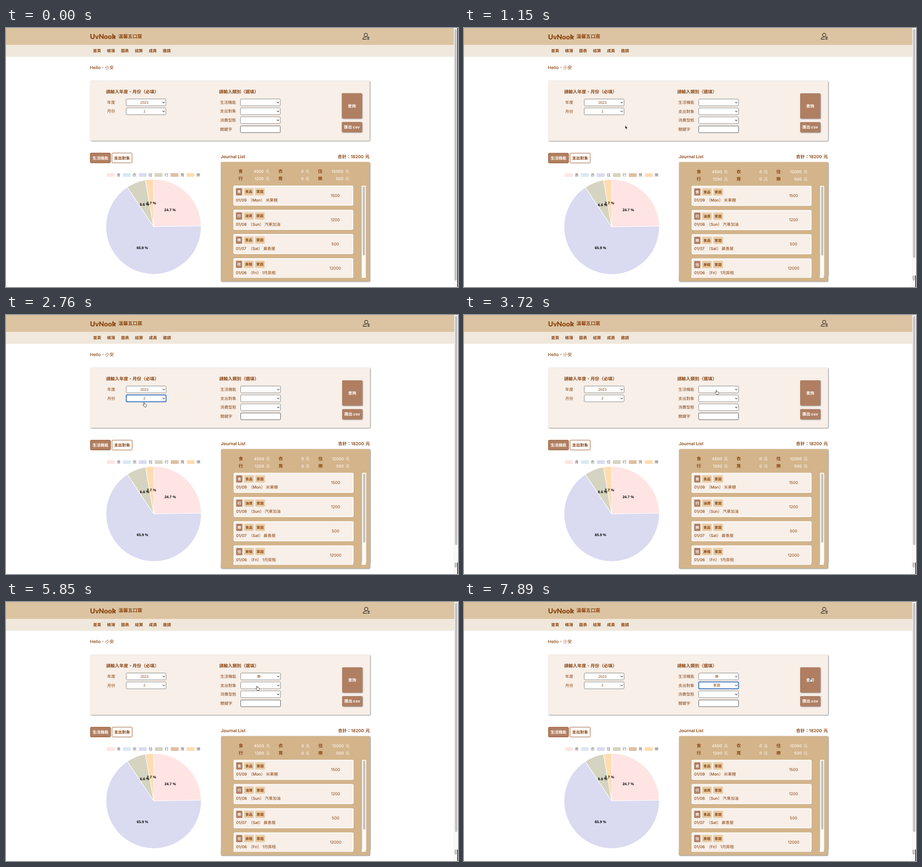
An HTML page that plays this animation: 987x567 px, repeating every 8 s.

```html
<!DOCTYPE html>
<html lang="zh-TW">
<head>
<meta charset="utf-8">
<title>Journal</title>
<style>
html, body { margin: 0; width: 100%; height: 100%; overflow: hidden; background: #fff; }
svg { display: block; font-family: Inter, "Noto Sans CJK TC", "Noto Sans CJK", sans-serif; text-rendering: geometricPrecision; }
.arial { font-family: "Liberation Sans", "Noto Sans CJK TC", sans-serif; }
.logo { font-family: Lato, sans-serif; }
.shadow { filter: drop-shadow(1.5px 1.5px 1.3px rgba(0, 0, 0, .5)); }
</style>
</head>
<body>
<svg id="stage" width="987" height="567" viewBox="0 0 987 567">
  <clipPath id="fresh"><rect x="183" width="804" height="542"/></clipPath>
  <clipPath id="list"><rect x="495" y="344" width="266" height="203.3"/></clipPath>
  <g id="first" transform="scale(.999)"></g>
  <g id="second" clip-path="url(#fresh)"></g>
  <g id="live"></g>
  <g id="arrow"><path d="M0 0V7.6L1.8 6 3 8.8 4.3 8.2 3.1 5.5H5.4Z" fill="#111" stroke="#fff" stroke-width=".6"/></g>
  <g id="hand"><path d="M1.1 .8C1.1-.2 2.6-.2 2.7.8L3 3.5C3.3 2.9 4.4 3 4.5 3.7 4.9 3.2 5.8 3.4 5.9 4.1 6.5 3.8 7.1 4.2 7.1 4.9V7L6.3 9.7H2.6L1.9 8.3-.4 5.9C-.8 5.1.3 4.6.9 5.2L1.6 5.8Z" fill="#fff" stroke="#222" stroke-width=".8" stroke-linejoin="round"/></g>
</svg>
<script>
const BROWN = '#8b4513', CLAY = '#b07f62', CREAM = '#f7efe8', TAN = '#d3b48b', GREY = '#c1c1c1';
const $ = id => document.getElementById(id);

const rect = (x, y, w, h, fill, more = '') =>
  `<rect x="${x}" y="${y}" width="${w}" height="${h}" fill="${fill}" ${more}/>`;

const text = (x, y, str, size = 8.7, { fill = BROWN, weight = 500, anchor = 'start', cls = '' } = {}) =>
  `<text x="${x}" y="${y}" font-size="${size}" fill="${fill}" font-weight="${weight}" text-anchor="${anchor}" class="${cls}">${str}</text>`;

const bold = { weight: 700 };
const mid = (fill, weight = 700, cls = '') => ({ fill, weight, cls, anchor: 'middle' });

function header() {
  const nav = ['首頁', '帳簿', '圖表', '結算', '成員', '邀請'];
  return rect(0, 0, 979, 37, '#dcc4a2') + rect(0, 37, 979, 26, '#f0e8dc') +
    text(183.5, 24.5, 'UvNook', 15, { weight: 900, cls: 'logo' }) +
    `<path d="M234.5 15.8 239 19.2 234.5 22.6" fill="none" stroke="${BROWN}" stroke-width="1.6"/>` +
    text(245.5, 22.2, '溫馨五口窩', 10.4, bold) +
    `<g fill="none" stroke="#222" stroke-width="1.2"><circle cx="786.5" cy="15.3" r="3.7"/>
     <path d="M788 24.6H780C780 21.5 782 20 786 20H788M789.5 19.8H794M789.5 22.2H794M789.5 24.6H794"/></g>` +
    nav.map((s, i) => text(190.2 + i * 30.5, 53.2, s, 8.7, { weight: 600 })).join('') +
    text(183.3, 90.3, 'Hello，小安', 9.6);
}

function select(x, y) {
  return rect(x, y, 87, 15, '#fff', 'rx="2" stroke="#767676" stroke-width=".9"') +
    `<path d="M${x + 79.6} ${y + 6.3}l2.4 2.5 2.4-2.5" fill="none" stroke="#444" stroke-width="1.1"/>`;
}

function button(y, h, label) {
  return rect(734, y, 44, h, CLAY, 'rx="2" class="shadow"') +
    text(756, y + h / 2 + 3.2, label, 8.7, mid('#fff'));
}

function form() {
  const labels = ['生活機能', '支出對象', '消費型態', '關鍵字'];
  return rect(184, 115.5, 611, 131.5, CREAM, 'rx="2" class="shadow"') +
    text(218.7, 143.3, '請輸入年度、月份（必填）', 9.6, bold) +
    text(465.7, 143.3, '請輸入類別（選填）', 9.6, bold) +
    text(221, 165.8, '年度') + text(221, 185.5, '月份') +
    select(262.5, 155.5) + select(262.5, 175) +
    text(302.3, 165.7, '2023', 8, mid(BROWN, 400, 'arial')) +
    labels.map((s, i) => text(468, 165.8 + i * 19.7, s)).join('') +
    [155.5, 175, 194.6].map(y => select(512.5, y)).join('') +
    rect(512.5, 214.5, 87, 14.7, '#fff', 'rx="1.5" stroke="#555"') +
    button(143, 55, '查詢') + button(206, 22.3, '匯出 csv');
}

function pie() {
  const cx = 322.5, cy = 435.5, r = 104, total = 18200;
  const names = [...'食衣住行育樂'];
  const colors = ['#ffe4e4', '#dbe7f5', '#dadaf1', '#d5d4c0', '#e0bea0', '#ffdcb0'];
  const sums = [4500, 0, 12000, 1200, 0, 500];
  const at = v => {
    const a = v / total * 2 * Math.PI;
    return `${cx + r * Math.sin(a)} ${cy - r * Math.cos(a)}`;
  };
  let out = '', acc = 0;
  names.forEach((name, i) => {
    const x = 220.5 + i * 34.85, next = acc + sums[i];
    out += rect(x, 318, 17, 8, colors[i]) + text(x + 21.2, 325.2, name, 8.7, { fill: '#666' });
    if (sums[i]) out += `<path d="M${cx} ${cy}L${at(acc)}A${r} ${r} 0 ${+(sums[i] > total / 2)} 1 ${at(next)}Z" fill="${colors[i]}" stroke="#fff" stroke-width="1.1"/>`;
    acc = next;
  });
  const marks = [[358.6, 401.2, '24.7'], [298, 484.3, '65.9'], [302.7, 389.5, '6.6'], [317.6, 386, '2.7']];
  return out + marks.map(([x, y, s]) => text(x, y, s + ' %', 8, mid('#000', 700, 'arial'))).join('');
}

function tabs() {
  const tab = (x, label, bg, fg) =>
    rect(x, 274, 44, 21.5, bg, `rx="2" stroke="${BROWN}" stroke-width=".9"`) +
    text(x + 22, 287.9, label, 8.7, mid(fg));
  return tab(184.3, '生活機能', CLAY, '#fff') + tab(231.5, '支出對象', '#fff', BROWN);
}

function card(i, [kind, tag, date, day, x, note, sum]) {
  const y = 346.3 + i * 53;
  const chip = (cx, w, s, bg, fg) =>
    rect(cx, y + 4.7, w, 15.8, bg, 'rx="1.5"') + text(cx + w / 2, y + 15.4, s, 7.8, mid(fg));
  return rect(498, y, 260, 42, CREAM, 'rx="2" stroke="#fff" stroke-width="1.8"') +
    chip(502.6, 13.6, kind, CLAY, '#fff') +
    chip(520, 21, tag, '#e8cca5', BROWN) + chip(544.5, 21, '家庭', '#e8cca5', BROWN) +
    text(502.5, y + 34, date) + text(529.8, y + 34, `（${day}）`) + text(x, y + 34, note) +
    text(719.6, y + 24, sum, 8.7, mid(BROWN, 400));
}

function journal() {
  const sums = ['4500', '0', '12000', '1200', '0', '500'];
  const ends = [563.5, 650.5, 737.5];
  const pale = { fill: '#fffaf3' };
  const cards = [
    ['食', '食品', '01/09', 'Mon', 567.5, '米果棚', 1500],
    ['行', '油資', '01/08', 'Sun', 565, '汽車加油', 1200],
    ['樂', '食品', '01/07', 'Sat', 562.5, '晨香屋', 500],
    ['住', '房租', '01/06', 'Fri', 559.8, '1月房租', 12000]
  ];
  return text(469.3, 285.3, 'Journal List', 9.5, { weight: 600 }) +
    text(725, 285.3, '合計：', 9.6, bold) + text(753.5, 285.3, '18200', 9.4, { weight: 600 }) +
    text(785, 285.3, '元', 9.6, bold) +
    rect(469.5, 293.5, 325.5, 261.5, TAN, 'rx="2" class="shadow"') +
    [...'食衣住行育樂'].map((s, i) => {
      const end = ends[i % 3], y = i < 3 ? 317.8 : 333.6;
      return text(508 + i % 3 * 87, y, s, 9.6, bold) +
        text(end, y, sums[i], 8.7, { ...pale, anchor: 'end' }) + text(end + 4, y, '元', 8.7, pale);
    }).join('') +
    `<g clip-path="url(#list)">${cards.map((c, i) => card(i, c)).join('')}</g>` +
    rect(777.5, 345.5, 9, 202, '#fafafa') + rect(779.8, 347.3, 4.7, 151, GREY, 'rx="2.3"');
}

const page = thumb => rect(0, 0, 987, 568, '#fff') + header() + form() + tabs() + pie() + journal() +
  rect(979, 0, 8, 568, '#fafafa') + rect(978.8, 0, .6, 568, '#e6e6e6') +
  rect(980.5, 2, 5, thumb, GREY, 'rx="2.5"');

$('first').innerHTML = page(551.5) + rect(986.6, 0, 2, 568, '#111');
$('second').innerHTML = page(501.5);

// start, end, steps, from x y, to x y (pointer tip)
const moves = [
  [840, 1390, 8, 390, 246, 314, 181],
  [2760, 2850, 1, 299.5, 191.5, 299.5, 191.5],
  [3022, 3720, 9, 299.5, 191.5, 548.8, 164.6],
  [5410, 5690, 4, 540.4, 203, 546, 184],
  [7260, 7890, 8, 533.8, 206.5, 754.5, 166]
];
// x, y, w, h of clickable areas
const hot = [[262, 155, 88, 37], [512, 155, 88, 16], [512, 174, 88, 17], [512, 194, 88, 16], [734, 143, 44, 55]];
const ease = p => p * p * (3 - 2 * p);

function pointer(t) {
  const m = moves.filter(m => t >= m[0]).pop();
  if (!m) return null;
  const [t0, t1, n, x0, y0, x1, y1] = m;
  const p = ease(Math.min(1, Math.floor((t - t0) / (t1 - t0) * n + 1e-6) / n));
  return [x0 + (x1 - x0) * p, y0 + (y1 - y0) * p];
}

const value = (x, y, s) => text(x, y, s, 8, mid(BROWN, 400, 'arial'));
const ring = (x, y) => rect(x, y, 87, 15, 'none', 'rx="2" stroke="#1763c4" stroke-width="1.7"');

function fields(t) {
  let out = value(302.3, 185.3, t < 2760 ? '1' : '2');
  if (t >= 2760 && t < 3720) out += ring(262.5, 175);
  if (t >= 5410) out += value(552, 165.6, '樂');
  if (t >= 5410 && t < 5850) out += ring(512.5, 155.5);
  if (t >= 7260) out += value(552, 185.3, '家庭') + ring(512.5, 175);
  return out;
}

let shown = '';
function draw(now) {
  const t = now % 8000;
  $('second').style.display = t < 130 ? 'none' : '';
  const html = fields(t);
  if (html !== shown) $('live').innerHTML = shown = html;
  const at = pointer(t);
  const over = at && hot.some(([x, y, w, h]) => at[0] >= x && at[0] <= x + w && at[1] >= y && at[1] <= y + h);
  for (const [id, on] of [['arrow', at && !over], ['hand', over]]) {
    $(id).style.display = on ? '' : 'none';
    if (on) $(id).setAttribute('transform', `translate(${at})`);
  }
}

const start = performance.now();
function tick() {
  draw(performance.now() - start);
  requestAnimationFrame(tick);
}
tick();
</script>
</body>
</html>
```
